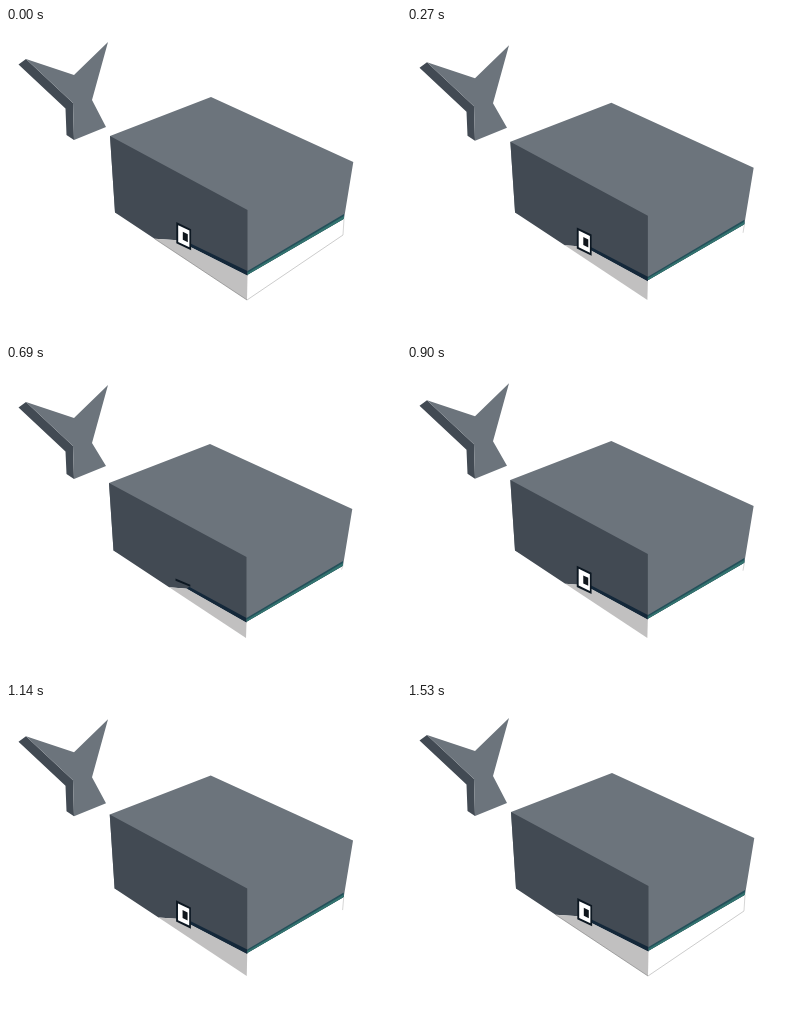
Write an HTML page with a canvas that moves like this. It is 395 px wide and 310 px high and loops after 1560 ms.

```html
<!DOCTYPE html>
<html lang="en">
<head>
<meta charset="utf-8">
<title>Tilting box</title>
<style>
  html, body { margin: 0; width: 100%; height: 100%; overflow: hidden; background: #fff; }
  canvas { display: block; width: 395px; height: 310px; }
</style>
</head>
<body>
<canvas id="stage" width="395" height="310"></canvas>
<script>
const ctx = document.getElementById('stage').getContext('2d');
const LOOP = 1560, STEP = 30;
const DARK = '#424a53', LIGHT = '#6c747c', NAVY = '#14283a';

const add = ([x, y], dx, dy) => [x + dx, y + dy];
const mix = (a, b, k) => [a[0] + (b[0] - a[0]) * k, a[1] + (b[1] - a[1]) * k];

function fill(points, color) {
  ctx.beginPath();
  points.forEach(p => ctx.lineTo(...p));
  ctx.closePath();
  ctx.fillStyle = color;
  ctx.fill();
}

function line(a, b, color) {
  ctx.beginPath();
  ctx.moveTo(...a);
  ctx.lineTo(...b);
  ctx.strokeStyle = color;
  ctx.lineWidth = 0.6;
  ctx.stroke();
}

// Both directions decelerate, with a short rest at full tilt
function tiltAt(t) {
  if (t < 690) return 1 - (1 - t / 690) ** 2;
  if (t < 750) return 1;
  return (1 - (t - 750) / 810) ** 2;
}

function opennessAt(t) {
  const away = Math.max(690 - t, t - 720, 0);
  return Math.min(1, 0.1 + away / 100);
}

function drawWing(tilt) {
  const isBase = p => p[1] > 95;
  const lower = p => add(p, 0, tilt * (isBase(p) ? 1 : 5));
  const depth = p => lower(add(p, -7.5, isBase(p) ? -5 : 5.5));
  const tip = [20, 31], notch = [67, 75], foot = [68, 112];
  const edge = [tip, notch, foot];

  fill([...edge.map(lower), ...edge.map(depth).reverse()], DARK);
  fill([tip, [68, 47], [102, 14], [86, 72], [100, 99], foot, notch].map(lower), LIGHT);
}

function drawBox(tilt) {
  const [back, right, front, left] = [[205, 69], [347.3, 134], [241.5, 182], [104, 108]]
    .map(p => add(p, -tilt, 9 * tilt));
  const leftLow = [109 - 1.5 * tilt, 184.5];
  const frontLow = [241 - tilt, 272];
  const sideLow = [337 - 1.5 * tilt, 207 - 3.5 * tilt];

  // Where the wall lifts off the ground, and where its band begins
  const rim = mix(leftLow, frontLow, 0.3 + 0.12 * tilt);
  const rimIn = add(rim, 23 - 5 * tilt, 1.5);
  const bandLow = add(front, 0, 65.5);
  const frontBand = d => add(front, 0, 61 + 3.7 * d);
  const sideBand = d => add(right, -9.3, 52 + 4.7 * d);

  fill([left, back, right, sideBand(1), frontBand(1), rimIn, leftLow], LIGHT);
  fill([left, front, bandLow, rimIn, rim, leftLow], DARK);
  fill([rim, rimIn, bandLow, frontLow], '#c1c0c0');
  fill([add(rimIn, 2, -2), frontBand(0), bandLow, rimIn], NAVY);
  fill([frontBand(0), sideBand(0), sideBand(1), frontBand(1)], '#24505a');
  fill([frontBand(0.45), sideBand(0.45), sideBand(1), frontBand(1)], '#33736f');
  line(sideBand(1), sideLow, '#bbb');

  // The ground edges show only while the box is nearly level
  ctx.globalAlpha = Math.max(0, 1 - tilt * 6);
  line(rim, frontLow, '#777');
  line(frontLow, sideLow, '#aaa');
  ctx.globalAlpha = 1;
}

function drawBadge(tilt, open) {
  const cx = 177.7 - 0.8 * tilt, cy = 208.2 + 8.5 * tilt;
  const slope = 0.4 + 0.08 * open;
  const plate = (dx, w, h, color) => {
    const corner = (sx, sy) => [cx + dx + sx * w, cy + slope * (dx + sx * w) + sy * h * open];
    fill([corner(-1, -1), corner(1, -1), corner(1, 1), corner(-1, 1)], color);
  };
  plate(0, 7.4, 10.6, '#0d1822');
  if (open > 0.2) {
    plate(0.1, 5.6, 8.4, '#fff');
    plate(1.6, 2.5, 4, '#10161c');
  }
}

function draw(now) {
  const t = Math.floor((now % LOOP) / STEP) * STEP;
  const tilt = tiltAt(t);
  ctx.fillStyle = '#fff';
  ctx.fillRect(0, 0, 395, 310);
  drawWing(tilt);
  drawBox(tilt);
  drawBadge(tilt, opennessAt(t));
}

const start = performance.now();
function tick() {
  draw(performance.now() - start);
  requestAnimationFrame(tick);
}
tick();
</script>
</body>
</html>
```
